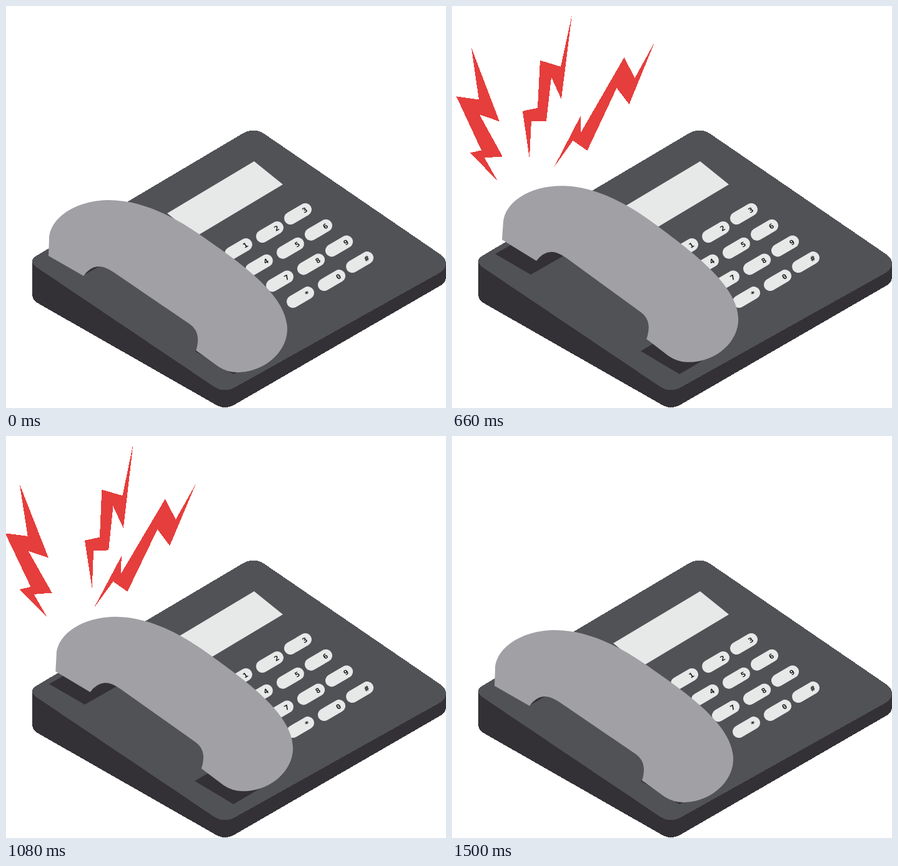
An HTML page for the animation above (1830 ms loop, 704x642 px).

```html
<!DOCTYPE html>
<html lang="en">
<head>
<meta charset="utf-8">
<title>Ringing phone</title>
<style>
  html, body { margin: 0; height: 100%; overflow: hidden; background: #fff; }
  svg { display: block; width: 100vw; height: 100vh; }
  .crisp { shape-rendering: crispEdges; }
  .dark { fill: #343136; }
  .key { stroke: #e7e9e8; stroke-width: 20; stroke-linecap: round; }
  text { font: bold 12px "DejaVu Sans Mono", monospace; text-anchor: middle; fill: #18181a; }
</style>
</head>
<body>
<svg viewBox="0 0 704 642">
  <path class="dark crisp" d="M42 405V460Q42 469 50 474L336 637Q350 645 365 637L696 446Q704 441 704 432V412L396 230Z"/>
  <path class="crisp" fill="#515256" d="M378 204Q396 193 413 204L694 396Q703 402 704 410Q704 420 694 426L368 608Q350 619 333 608L50 418Q34 407 50 398Z"/>
  <path fill="#e7e9e8" d="M258 331L397 248L443 285L304 368Z"/>
  <g id="keys"></g>
  <path class="dark" d="M69 396L126 429L182 397L125 364ZM302 551L364 588L420 555L358 518Z"/>
  <path id="handset" fill="#a1a0a5" d="M68 399L69 372C70 338 112 310 165 310C215 310 265 334 310 365C370 407 450 460 450 516C450 552 414 585 370 585Q354 585 340 576L304 550Q307 542 307 531Q306 516 294 508L172 425Q157 415 147 416Q134 417 124 431Z"/>
  <g id="bolts" class="crisp" fill="#e53e3c">
    <path d="M0 0L-21 -37L8 -39L-29 -106L3 -95L-42 -213L-30 -130L-66 -135L-26 -49L-44 -45Z"/>
    <path d="M0 0L3 -60L27 -60L35 -130L51 -95L68 -230L50 -147L17 -157L13 -81L-11 -76Z"/>
    <path d="M0 0L30 -42L53 -26L100 -126L120 -100L161 -200L129 -142L112 -175L42 -54L43 -83Z"/>
  </g>
</svg>
<script>
const $ = id => document.getElementById(id);
const STEP = 30, LOOP = 1830, STEPS = 40, RAMP = 12, SHAKE = 5;

// Keypad: three column heads, rows run down the slanted face
const columns = [[372, 388], [422, 361], [467, 332]];
$('keys').innerHTML = [...'123456789*0#'].map((label, i) => {
  const [x, y] = columns[i % 3], row = Math.floor(i / 3);
  return `<g transform="translate(${x + 33 * row} ${y + 25.7 * row})">
    <path class="key" d="M-12 7L12 -7"/>
    <text transform="matrix(.87 -.5 .5 .75 11 -6)" y="4.3">${label}</text></g>`;
}).join('');

// Each bolt grows from home to rest, then sways around rest; lag and turn in degrees
const bolts = [
  { home: [93, 296], rest: [75, 290], reach: [9, 11], lag: [-113, -20], turn: -1.7 },
  { home: [132, 238], rest: [133, 241], reach: [12, 3], lag: [5, 127], turn: -1.5 },
  { home: [151, 250], rest: [157, 271], reach: [20, 16], lag: [-145, -7], turn: 1.7 }
];

const swing = (step, lag) => Math.cos(2 * Math.PI * step / SHAKE - lag * Math.PI / 180);
const ease = u => (u * u * (3 - 2 * u)) ** 2.5;

function draw(time) {
  const step = Math.min(STEPS, Math.max(0, Math.floor((time % LOOP - 300) / STEP)));
  const lift = ease(Math.min(1, step / RAMP, (STEPS - step) / RAMP));
  const tilt = step % STEPS ? 0.15 + 1.7 * swing(step, 132) : 0;

  $('handset').setAttribute('transform',
    `translate(${10.4 * lift} ${-19.7 * lift}) rotate(${tilt} 260 447)`);

  bolts.forEach(({ home, rest, reach, lag, turn }, i) => {
    const [x, y] = home.map((from, axis) =>
      from + (rest[axis] + reach[axis] * swing(step, lag[axis]) - from) * lift);
    const angle = turn * (1 + swing(step, -36)) / 2;
    $('bolts').children[i].setAttribute('transform',
      `translate(${x} ${y}) rotate(${angle}) scale(${lift})`);
  });
}

const start = performance.now();
function tick() {
  draw(performance.now() - start);
  requestAnimationFrame(tick);
}
tick();
</script>
</body>
</html>
```
